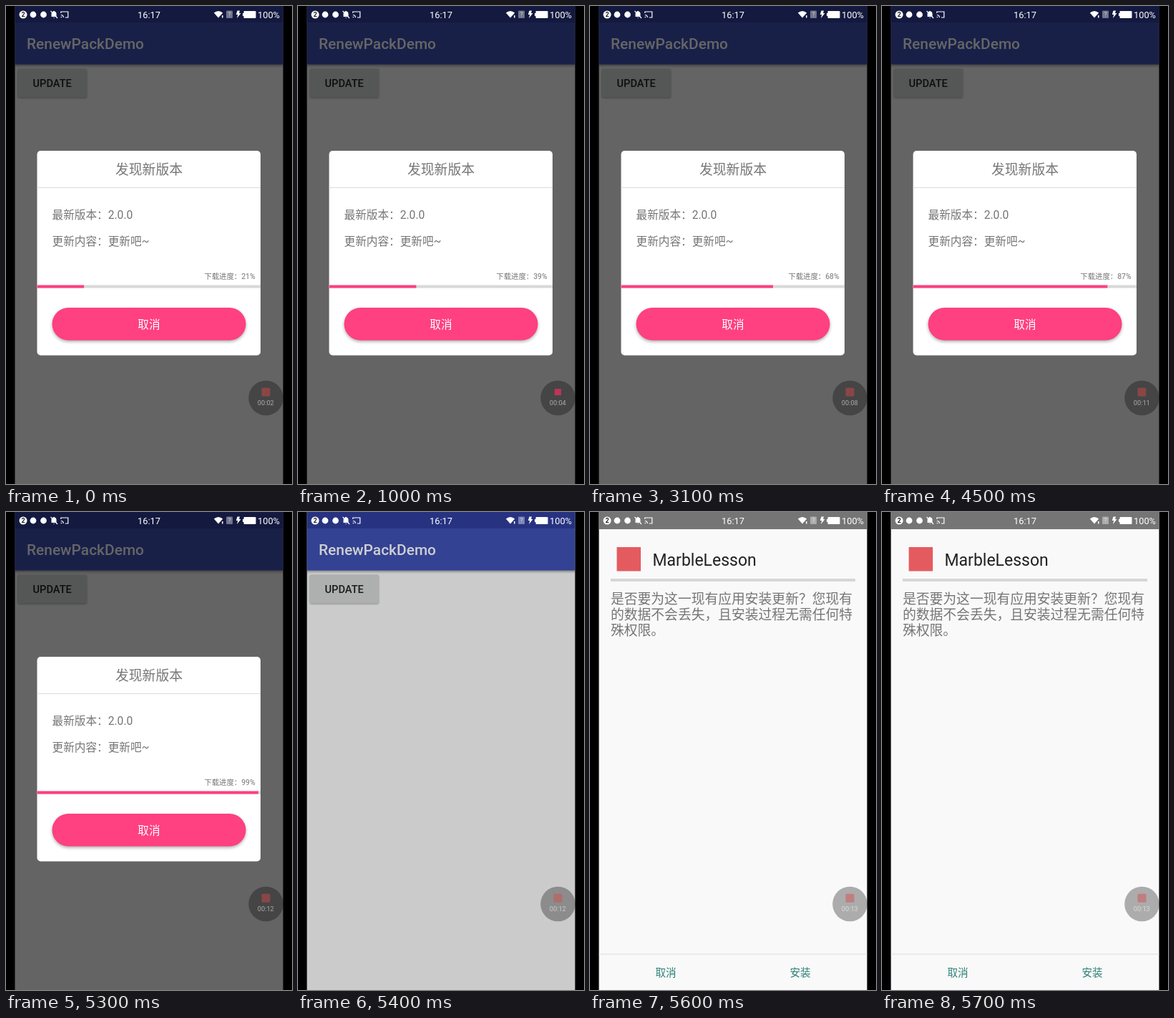
Animation, 400 px wide and 667 px high, one loop 5800 ms. Source, as an HTML page:

```html
<!DOCTYPE html>
<html lang="zh-CN">
<head>
<meta charset="utf-8">
<title>App update</title>
<style>
  html, body { margin: 0; width: 100%; height: 100%; overflow: hidden; background: #000; }
  svg { display: block; width: 100%; height: 100%; }
  text { font-family: Roboto, "Noto Sans CJK SC", "Noto Sans CJK", sans-serif; fill: #757575; }
  .mid { text-anchor: middle; }
  .medium { font-weight: 500; }
  .white { fill: #fff; }
  .pink { fill: #ff4081; }
  .teal { fill: #2f8077; font-size: 14.6px; }
  .body { font-size: 15.65px; }
  .para { font-size: 18.8px; }
  .bar { filter: drop-shadow(0 2px 1.5px rgba(0,0,0,.35)); }
  .raised { filter: drop-shadow(0 1px 1px rgba(0,0,0,.3)); }
  .pill { filter: drop-shadow(0 2px 2px rgba(0,0,0,.32)); }
</style>
</head>
<body>
<svg viewBox="0 0 400 667">
  <g id="app">
    <rect x="12.5" width="375" height="667" fill="#fafafa"/>
    <rect class="bar" x="12.5" y="23" width="375" height="58.5" fill="#3f51b5"/>
    <rect x="12.5" width="375" height="23" fill="#303f9f"/>
    <text class="white medium" x="29" y="60" font-size="20.9">RenewPackDemo</text>
    <rect class="raised" x="16.5" y="87.5" width="96.5" height="40" rx="2" fill="#d6d7d7"/>
    <text class="mid medium" x="64.7" y="113" font-size="14.6" style="fill:#212121">UPDATE</text>
    <rect id="dim" x="12" width="376" height="667"/>
  </g>

  <g id="dialog">
    <rect x="43.5" y="202" width="312.5" height="285.5" rx="5" fill="#fff"/>
    <text class="mid" x="200" y="235" font-size="18.8">发现新版本</text>
    <rect x="43.5" y="253" width="312.5" height="1" fill="#dcdcdc"/>
    <text class="body" x="64.5" y="297">最新版本：2.0.0</text>
    <text class="body" x="64.5" y="333.5">更新内容：更新吧~</text>
    <text id="label" x="348.5" y="380.5" font-size="10.4" text-anchor="end"></text>
    <rect x="43.5" y="389.5" width="312.5" height="4" fill="#d8d8d8"/>
    <rect id="progress" class="pink" x="43.5" y="389.5" height="4"/>
    <rect class="pink pill" x="64.5" y="421" width="271" height="45.5" rx="22.75"/>
    <text class="mid white body" x="200" y="449.5">取消</text>
  </g>

  <g id="install">
    <rect x="12.5" width="375" height="667" fill="#f9f9f9"/>
    <rect x="12.5" width="375" height="24" fill="#757575"/>
    <rect x="37.5" y="49" width="33.5" height="33.5" fill="#e45b5f"/>
    <text x="87.5" y="74.5" font-size="23" style="fill:#212121">MarbleLesson</text>
    <rect x="29" y="93" width="342" height="4" fill="#d6d6d6"/>
    <text class="para" x="29" y="127.5">是否要为这一现有应用安装更新？您现有</text>
    <text class="para" x="29" y="149.5">的数据不会丢失，且安装过程无需任何特</text>
    <text class="para" x="29" y="171.5">殊权限。</text>
    <rect x="12.5" y="616.5" width="375" height="1" fill="#dedede"/>
    <text class="mid teal" x="106" y="648">取消</text>
    <text class="mid teal" x="294" y="648">安装</text>
  </g>

  <!-- status icons -->
  <g fill="#fff">
    <circle cx="24" cy="12" r="5.5"/>
    <text class="mid" x="24" y="15.2" font-size="9" font-weight="700" style="fill:#222">2</text>
    <circle cx="38" cy="12" r="4.4"/>
    <circle cx="52.5" cy="12" r="4.4"/>
    <path d="M63.5 15V11q0-3 2.5-3.5q1-1.5 2 0q2.500.5 2.500 3.500v4zM66 16h2.200q-1 1.500-2.200 0"/>
    <path d="M62.500 7l9.500 10" stroke="#fff" stroke-width="1.200"/>
    <path d="M76.800 10V8h10v8h-4M76.800 12.500q3.500 0 3.500 3.500M76.800 15l1 1" fill="none" stroke="#fff" stroke-width="1.200"/>
    <text class="mid white" x="200" y="16.700" font-size="12.800">16:17</text>
    <path d="M290.800 9.500q6.200-5 12.400 0l-6.200 7z"/>
    <rect x="302" y="13" width="1.500" height="3.500"/>
    <rect x="308" y="6.500" width="9" height="10.500" rx="1" opacity=".4"/>
    <text class="mid white" x="312.500" y="15" font-size="8.500" opacity=".6">?</text>
    <path d="M323.500 6.500h3.500l-1 3.500h2.500l-5.500 7l1.200-5h-2.400z"/>
    <rect x="331" y="10" width="2" height="4"/>
    <rect x="332.500" y="7" width="17" height="10" rx="1"/>
    <text class="white" x="352" y="16.700" font-size="12.800">100%</text>
  </g>

  <!-- recorder bubble -->
  <circle cx="363.500" cy="547" r="24.300" opacity=".31"/>
  <rect id="rec"/>
  <text id="clock" class="mid white" x="363.300" y="557" font-size="9.200" opacity=".55"></text>
</svg>
<script>
const $ = id => document.getElementById(id);
const LOOP = 5800, STEP = 100;
const holds = [2, 5, 6, 11, 12, 16, 43, 48, 51];               // steps without progress
const curve = [[0, 21], [7, 39], [25, 68], [38, 87], [44, 99]]; // [advance, percent]

function set(id, attrs) {
  for (const key in attrs) $(id).setAttribute(key, attrs[key]);
}

function show(id, on) {
  $(id).style.display = on ? "" : "none";
}

function percentAt(step) {
  const n = step - holds.filter(h => h <= step).length;
  const i = Math.max(1, curve.findIndex(p => p[0] >= n));
  const [a, b] = [curve[i - 1], curve[i]];
  return Math.round(a[1] + (b[1] - a[1]) * (n - a[0]) / (b[0] - a[0]));
}

function draw(t) {
  const step = Math.floor(t / STEP);
  const percent = percentAt(Math.min(step, 53));
  show("dialog", step < 54);
  show("app", step < 56);
  show("install", step >= 56);
  $("label").textContent = `下载进度：${percent}%`;
  set("progress", { width: 3.125 * percent });
  set("dim", { opacity: step < 54 ? .6 : step < 55 ? .19 : .42 });
  set("app", { transform: step === 55 ? "translate(18 46) scale(.91)" : "" });

  const bright = step >= 10 && step < 13;
  const size = bright ? 9 : 12;
  set("rec", {
    x: 363.5 - size / 2, y: 538.7 - size / 2, width: size, height: size,
    rx: bright ? 0 : 1.5, fill: bright ? "#be3458" : "rgba(220,70,70,.45)"
  });
  $("clock").textContent = "00:" + String(2 + Math.floor(t / 500)).padStart(2, "0");
}

const start = performance.now();
function tick() {
  draw((performance.now() - start) % LOOP);
  requestAnimationFrame(tick);
}
tick();
</script>
</body>
</html>
```
